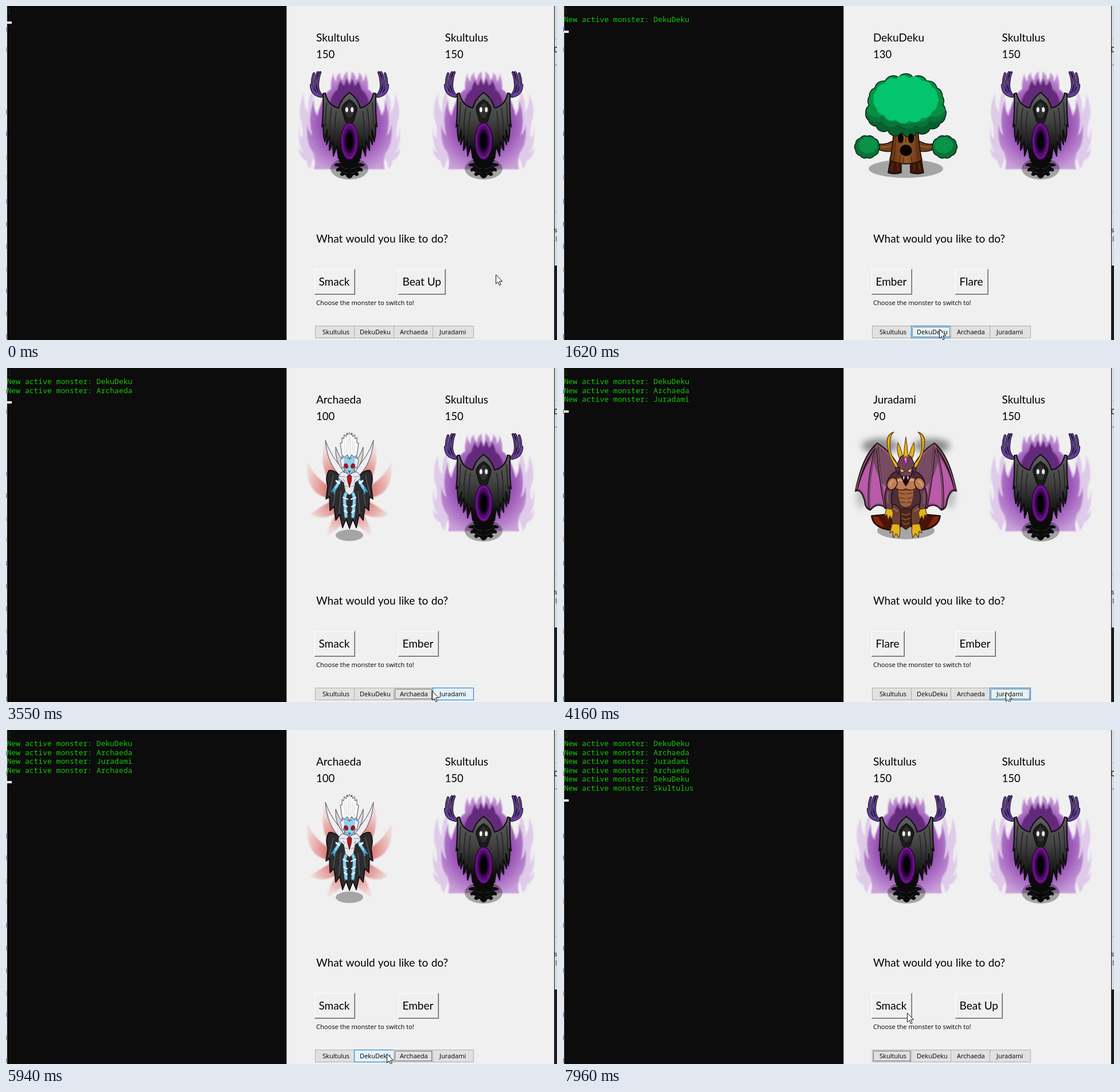
Write an HTML page that moves like this. It is 961 by 583 pixels and loops after 8 s.

```html
<!DOCTYPE html>
<html lang="en">
<head>
<meta charset="utf-8">
<title>Monster battle</title>
<style>
html, body { margin: 0; width: 100%; height: 100%; overflow: hidden; background: #f0f0f0; }
svg { display: block; width: 961px; height: 583px; }
text { white-space: pre; }
.big { font: 19px Lato, Carlito, sans-serif; }
.num { font: 18.5px Lato, Carlito, sans-serif; }
.ask { word-spacing: .6px; }
.small { font: 11.1px "Open Sans", "Noto Sans", sans-serif; }
.mono { font: 13.03px "Noto Sans Mono", "Liberation Mono", monospace; fill: #16c60c; }
rect { shape-rendering: crispEdges; }
</style>
</head>
<body>
<svg viewBox="0 0 961 583">
  <defs>
    <filter id="soft" x="-20%" y="-20%" width="140%" height="140%"><feGaussianBlur stdDeviation="1.3"/></filter>
    <filter id="smoke" x="-40%" y="-40%" width="180%" height="180%"><feGaussianBlur stdDeviation="6"/></filter>
    <radialGradient id="flame" gradientUnits="userSpaceOnUse" cx="0" cy="205" r="90">
      <stop offset=".35" stop-color="#7a359c"/><stop offset=".6" stop-color="#9c58b8"/><stop offset="1" stop-color="#c9a0d9"/>
    </radialGradient>
    <radialGradient id="petal" gradientUnits="userSpaceOnUse" cx="0" cy="212" r="78">
      <stop offset=".3" stop-color="#cf5555"/><stop offset=".65" stop-color="#e29a97"/><stop offset="1" stop-color="#efd9d7"/>
    </radialGradient>
    <linearGradient id="cloak" gradientUnits="userSpaceOnUse" x1="0" y1="150" x2="0" y2="255">
      <stop offset="0" stop-color="#606060"/><stop offset=".45" stop-color="#454545"/><stop offset="1" stop-color="#0b0b0b"/>
    </linearGradient>
    <linearGradient id="bark"><stop offset="0" stop-color="#5f300f"/><stop offset=".5" stop-color="#96582a"/><stop offset="1" stop-color="#5f300f"/></linearGradient>
  </defs>
  <g id="back"></g>
  <g id="live"></g>
</svg>
<script>
const $ = id => document.getElementById(id);
const path = (d, fill, stroke = 'none', w = 1) =>
  `<path d="${d}" fill="${fill}" stroke="${stroke}" stroke-width="${w}" stroke-linejoin="round" stroke-linecap="round"/>`;
const oval = (x, y, rx, ry, fill, extra = '') => `<ellipse cx="${x}" cy="${y}" rx="${rx}" ry="${ry}" fill="${fill}" ${extra}/>`;
const box = (x, y, w, h, fill, extra = '') => `<rect x="${x}" y="${y}" width="${w}" height="${h}" fill="${fill}" ${extra}/>`;
const frame = (x, y, w, h, color, extra = '') => box(x + .5, y + .5, w - 1, h - 1, 'none', `stroke="${color}" ${extra}`);
const text = (s, x, y, cls, extra = '') => `<text x="${x}" y="${y}" class="${cls}" ${extra}>${s}</text>`;
const both = s => `<g>${s}</g><g transform="scale(-1 1)">${s}</g>`;
const blur = (s, id = 'soft') => `<g filter="url(#${id})">${s}</g>`;

// Bumpy outline around an ellipse
function cloud(x, y, rx, ry, n, fill, stroke = 'none') {
  const pt = i => {
    const a = (i + .5) / n * 2 * Math.PI;
    return (x + rx * Math.cos(a)).toFixed(1) + ' ' + (y + ry * Math.sin(a)).toFixed(1);
  };
  const r = (rx + ry) * 2.3 / n;
  let d = 'M' + pt(0);
  for (let i = 1; i <= n; i++) d += `A${r} ${r} 0 0 1 ${pt(i)}`;
  return path(d + 'Z', fill, stroke, 1.6);
}

// Each figure is centred on x = 0
function wraith() {
  const pale = 'M28 142Q45 165 58 186Q66 166 62 144Q74 160 72 186Q81 175 79 152Q89 172 86 196Q79 214 83 232Q88 224 87 207Q92 238 80 256Q85 254 88 246Q89 264 75 270Q74 280 68 284Q66 270 60 264Q62 282 50 285L0 285L0 150';
  const main = 'M0 134Q4 124 3 114Q12 120 11 130Q18 124 16 116Q25 122 22 132Q28 128 28 117Q34 133 32 145C44 152 50 168 56 192Q64 180 61 162Q74 194 65 226Q72 220 73 206Q77 240 63 256Q58 274 62 285L0 285';
  const finger = 'M48 157Q57 147 55 134Q54 122 51 116M51 157Q61 148 60 134Q59 122 55 116M52 157Q66 150 65 134Q65 126 62 118M49 158Q66 156 67 138';
  const sleeve = 'M0 151Q8 157 13 164Q17 171 19 178Q38 174 42 152L46 153Q45 186 48 211L45 207Q47 222 43 237L39 216L40 242L34 226L35 252L29 236L28 262L22 244L19 266L10 262L0 270';
  const foot = 'M0 264L16 262Q21 272 14 274Q28 274 26 279Q21 280 17 281Q26 284 22 289Q17 287 14 290Q20 295 12 297Q7 292 5 298Q3 301 0 301';
  return blur(both(path(pale, '#dfcaea')) + both(path(main, 'url(#flame)')) +
      both(path('M0 138Q3 134 4 126Q8 132 9 139Q14 136 15 129Q20 138 21 146Q32 152 36 180L36 250L0 250', '#64297c'))) +
    oval(0, 284, 33, 19, '#000', 'opacity=".32"') +
    both(path(finger, 'none', '#160c24', 4.4) + path(finger, 'none', '#67419c', 2.2) +
      path(foot, '#0a0a0a') + path('M3 284Q12 284 17 277M3 292Q9 292 14 286', 'none', '#333', 1) +
      path(sleeve, 'url(#cloak)', '#0c0c0c', 2) +
      path('M31 178Q35 200 34 222M40 168Q42 190 42 210M23 184Q27 210 25 240', 'none', '#222', 1.5) +
      path('M0 163L7 168Q14 175 13 182L7 202L0 208', '#1b1b1b', '#080808', 1) +
      path('M0 168Q9 176 8 184L4 194L0 196', '#303030') +
      oval(4.7, 181, 3.2, 5, '#777') + oval(4.7, 181, 2, 4, '#fff')) +
    oval(0, 236, 15, 32, '#6d148a', 'stroke="#2d053a" stroke-width="1.5"') + oval(0, 236, 12, 27, '#530a70') +
    oval(0, 236, 9, 21, '#2b033c') + oval(0, 236, 6.5, 16, '#050008');
}

function tree() {
  const ink = '#0c2b18';
  const hand = cloud(67.5, 246, 21, 18.5, 10, '#087237', ink) + cloud(66, 243, 16, 13, 9, '#0a9348');
  return oval(0, 284, 65, 16, '#a5a5a5') +
    both(path('M8 268L27 268L31 291Q20 295 8 291Z', '#3a150a', '#160703', 1.5) + path('M15 273L14 288M23 274L25 288', 'none', '#6d3115', 1.5) +
      path('M20 234Q36 244 50 240L52 249Q36 256 22 253Z', '#70401a', '#241005', 1.5) +
      path('M24 244Q38 248 50 245', 'none', '#a5672d', 1.5)) +
    path('M-21 208L21 208Q22 244 28 269Q0 282 -28 269Q-22 244 -21 208Z', 'url(#bark)', '#241005', 1.8) +
    path('M-17 220L-21 268M-10 260L-11 274M17 220L21 268M9 262L11 274M0 224L0 238M-4 265L-4 276', 'none', '#57290c', 1.4) +
    both(hand) +
    cloud(0, 187, 70, 34, 17, '#07602f', ink) +
    cloud(0, 166, 65, 42, 16, '#079044', ink) +
    path('M-70 190Q-56 209 -42 201Q-30 218 -13 208Q3 221 17 209Q32 217 42 201Q58 207 70 188Q60 170 0 170Q-60 170 -70 190Z', '#08733a') +
    path('M-69 183Q-56 200 -42 192Q-28 207 -13 200Q3 212 17 200Q32 207 42 192Q58 197 69 182Q55 150 0 150Q-55 150 -69 183Z', '#079044') +
    cloud(0, 163, 56, 37, 15, '#02c56d') +
    both(oval(9, 231, 5, 8.5, '#080402')) + oval(0, 252, 10.5, 10, '#080402');
}

function seraph() {
  const line = '#4b4b55', skin = '#8fd0ea';
  const leg = 'M4 216Q10 222 8 238L6 259', arm = 'M14 191L21 204L27 213';
  return blur(both(path('M10 195Q24 165 43 131Q54 165 34 202Z', 'url(#petal)') +
      path('M18 215Q56 200 73 164Q77 200 58 218Q40 230 18 230Z', 'url(#petal)') +
      path('M18 225Q42 236 68 255Q48 268 20 252Z', 'url(#petal)') +
      path('M8 238Q32 258 39 291Q16 282 3 258Z', 'url(#petal)'))) +
    oval(0, 292, 24, 10, '#a5a5a5') +
    both(path('M0 188L14 190Q28 176 36 179Q43 192 38 206L41 229L35 225L34 249L27 242L24 266L17 256L12 279L6 264L0 280', '#2c2c2e', '#080808', 1.5) +
      path('M28 188L36 222M22 198L28 240M15 215L18 254M7 226L8 264', 'none', '#5b5b5e', 1.3) +
      path('M14 190Q39 168 42 126Q33 154 9 179Z', '#eeeef2', line) +
      path('M9 182Q26 164 24 138Q18 155 8 168Z', '#d9d9df', line) +
      path(leg, 'none', '#25536b', 7.5) + path(leg, 'none', skin, 5) + path('M3 229L11 226M4 242L10 239M4 252L9 249', 'none', '#f4f4f8', 2.2) +
      path(arm, 'none', '#25536b', 7) + path(arm, 'none', skin, 4.5) + path('M18 201L23 197', 'none', '#fff', 3) +
      path('M26 210L31 216M25 213L27 219', 'none', '#3d9cc6', 2.2) +
      path('M0 185L12 181Q20 185 19 193L10 200L7 216L0 222', '#e7e7ee', line) +
      path('M8 190L17 189M8 198L11 194M3 207L8 206', 'none', '#8d8d9a', 1.2) +
      path('M0 148L13 154L14 166L8 178L0 188', skin, '#315f78') +
      path('M10 156L16 160L13 175L9 171M0 159L4 157', '#eeeef4', line, .8) +
      oval(6, 171, 3.8, 4.8, '#9d171c', 'transform="rotate(25 6 171)"') +
      path('M0 113L3 117L4 113L6 120L9 116L10 124L13 121L13 131L16 131L13 152L8 156L4 151L0 158', '#fafafa', line) +
      path('M1 120L2 150M5 124L5 148M9 128L8 149', 'none', '#d0d0d6', .8)) +
    path('M-4 189L0 186L4 189L3 198L0 209L-3 198Z', '#b6161c', '#4f0508', .8) +
    path('M-3 179L0 185L3 179Z', '#337c9f');
}

function demon() {
  const ink = '#241019', gold = '#e3b11e', hide = '#65414f', flesh = '#bd7d54';
  const forearm = 'M29 213Q33 226 29 242';
  return blur(both(oval(45, 136, 32, 13, '#8c8c8c') + oval(78, 222, 7, 24, '#b5b5b5')), 'smoke') +
    oval(0, 284, 50, 15, '#a5a5a5') +
    both(path('M10 178Q24 146 50 131Q76 153 88 215Q78 210 72 232Q71 246 62 248Q48 232 34 246L14 220Z', '#774b62', ink, 2) +
      path('M58 156Q74 176 85 211Q76 208 69 232Q69 243 62 245Q49 230 35 241L30 212Q50 196 58 156Z', '#b95aab') +
      path('M50 133Q68 190 64 246M50 133Q47 190 36 244M50 133Q74 165 86 213', 'none', ink, 3.8) +
      path('M50 133Q67 190 64 244M50 133Q46 190 36 242M15 176Q28 148 50 134Q75 160 86 211', 'none', '#8d5c79', 1.8) +
      path('M0 252L60 258Q58 279 28 283L0 274', '#4a1308', '#190402', 1.8) +
      path('M48 260L58 259Q55 273 38 278Z', '#83250d') +
      path('M0 165L16 180Q30 186 33 200L29 235Q32 252 20 258L0 262', '#4c2e38', ink, 1.5) +
      path('M8 250Q18 232 32 241Q38 254 26 264L21 277L10 276Z', '#6d4034', ink, 1.6) +
      path('M15 250Q24 242 30 248', 'none', '#a0694a', 2.2) +
      path('M11 273L24 272L28 288L23 285L22 296L17 289L12 296L10 286Z', gold, '#523708', 1.2) +
      path('M0 212Q8 215 14 210Q15 226 9 240L0 244', '#a2633f', '#4b2114', 1.2) +
      path('M2 220L12 218M2 228L11 226M2 235L9 234', 'none', '#66351f', 1.6) +
      path('M0 193Q10 188 18 194Q22 204 16 211Q8 215 0 211', flesh, '#4b2114', 1.4) +
      path('M4 197Q11 193 16 198', 'none', '#e3af83', 2.4) +
      path(forearm, 'none', ink, 13) + path(forearm, 'none', hide, 9.5) + path('M31 218Q33 227 31 236', 'none', '#8f6072', 2) +
      oval(24, 202, 8.5, 11, flesh, `stroke="${ink}" stroke-width="1.5" transform="rotate(-25 24 202)"`) +
      path('M22 197Q27 199 28 206', 'none', '#dba57b', 2) +
      path('M24 247L34 245L37 259L33 256L31 266L28 258L24 264L22 253Z', gold, '#523708', 1.2) +
      path('M12 170Q32 152 27 125Q26 115 21 112Q36 116 32 138Q29 158 15 178Z', gold, '#5e400a', 1.4) +
      path('M11 158Q17 146 14 130Q7 143 5 156Z', gold, '#5e400a', 1.1) +
      path('M0 150L9 155L15 168L11 182L6 195L0 201', '#6d4355', ink, 1.4) +
      path('M2 180L11 175L8 182Z', '#ffe14d', ink, .8) +
      path('M0 189L7 188L5 199L0 207', '#1e080c') + path('M5 189L4 196L2 190Z', '#fff') +
      path('M11 173L19 174L14 186Z', '#533144', ink, 1)) +
    path('M-4 156Q-3 138 0 120Q3 138 4 156Z', gold, '#5e400a', 1.1) +
    oval(0, 161, 3, 6.5, '#d843c0', 'stroke="#571350"') + oval(-.8, 159, 1, 2.8, '#ffc5f5') +
    path('M-10 248Q0 242 10 248L8 276L0 282L-8 276Z', '#4d2419', ink, 1.2) +
    path('M-7 254Q0 259 7 254M-7 262Q0 267 7 262M-6 270Q0 275 6 270', 'none', '#935535', 1.6);
}

const monsters = [
  { name: 'Skultulus', hp: 150, moves: ['Smack', 'Beat Up'], art: wraith(), x: 599, left: 539, right: 607, label: 552 },
  { name: 'DekuDeku', hp: 130, moves: ['Ember', 'Flare'], art: tree(), x: 598, left: 607, right: 676, label: 617 },
  { name: 'Archaeda', hp: 100, moves: ['Smack', 'Ember'], art: seraph(), x: 599, left: 676, right: 744, label: 687 },
  { name: 'Juradami', hp: 90, moves: ['Flare', 'Ember'], art: demon(), x: 598, left: 744, right: 816, label: 756 }
];
const moveWidth = { Smack: 71, Ember: 71, Flare: 58, 'Beat Up': 83 };
const picks = [[1600, 1], [2910, 2], [4160, 3], [5470, 2], [6320, 1], [7330, 0]];
const mouse = [
  [602, 854, 469], [1460, 656, 564], [1692, 656, 564], [2460, 749, 552], [2540, 749, 552], [2770, 722, 564],
  [3310, 722, 564], [3545, 743, 564], [3855, 772, 566], [4250, 772, 566], [4780, 724, 566], [5630, 724, 566],
  [5940, 664, 565], [6100, 655, 565], [6570, 655, 565], [6800, 599, 565], [6885, 599, 565], [7100, 592, 567],
  [7500, 592, 567], [7950, 600, 494]
];
const loop = 8000, step = 77.4;

const stand = (m, x) => `<g transform="translate(${x} 0)">${m.art}</g>`;

function moveButton(s, x) {
  const w = moveWidth[s], y = 459, h = 45;
  return box(x, y, w, h, '#696969') + box(x, y, w - 1, h - 1, '#fff') + box(x + 1, y + 1, w - 2, h - 2, '#a0a0a0') +
    box(x + 1, y + 1, w - 3, h - 3, '#f0f0f0') + text(s, x + 7.5, 488, 'big');
}

// Each tab's right edge lies under its neighbour
function tab(m, hover, pressed, focus) {
  const w = m.right - m.left + (m.right < 816 ? 1 : 0);
  const [fill, edge] = pressed ? ['#cce4f7', '#005499'] : hover ? ['#e5f1fb', '#0078d7'] : ['#e1e1e1', '#adadad'];
  return box(m.left, 558, w, 22, fill) + frame(m.left, 558, w, 22, edge) +
    (focus ? frame(m.left + 2, 560, w - 4, 18, '#000', 'stroke-dasharray="1 1"') : '') +
    text(m.name, m.label, 573, 'small');
}

function mouseAt(t) {
  const i = mouse.findIndex(k => k[0] > t);
  if (i < 0) return mouse.at(-1).slice(1);
  if (i === 0) return mouse[0].slice(1);
  const [a, b] = [mouse[i - 1], mouse[i]], f = (t - a[0]) / (b[0] - a[0]);
  return [1, 2].map(j => Math.round(a[j] + (b[j] - a[j]) * f));
}

function backdrop() {
  const specks = [[41, '#2860b0'], [76, '#777'], [185, '#2860b0'], [223, '#4a3d9c'], [264, '#888'], [299, '#d08a3c'],
    [341, '#2860b0'], [381, '#555'], [420, '#555'], [460, '#c07830'], [497, '#2860b0'], [537, '#555'], [577, '#555']];
  return box(0, 0, 961, 583, '#f0f0f0') + box(0, 0, 2, 583, '#dfe1e6') +
    specks.map(([y, c]) => box(0, y - 4, 1, 8, c)).join('') +
    box(2, 0, 487, 583, '#0c0c0c') + box(489, 0, 1, 583, '#a0a0a0') + text('1', 1.5, 13, 'mono', 'opacity=".25"') +
    box(956, 0, 1, 583, '#111') + box(957, 0, 4, 453, '#d6dae2') + box(957, 453, 4, 130, '#1b1b1b') +
    box(957, 57, 4, 1, '#bbb') + box(957, 71, 4, 10, '#555') + box(958, 73, 3, 6, '#ddd') + box(957, 102, 4, 2, '#78aede') +
    box(957, 360, 4, 1, '#bbb') + text('s', 956, 395, 'small') + box(959, 402, 1, 9, '#3c3c88') +
    text('Skultulus', 765.5, 62, 'big') + text('150', 765.5, 91, 'num') + stand(monsters[0], 833) +
    text('What would you like to do?', 541, 413, 'big ask') +
    text('Choose the monster to switch to!', 541, 522, 'small');
}

function scene(t) {
  const done = picks.filter(p => t >= p[0]);
  const next = picks[done.length];
  const press = next && t >= next[0] - 78 ? next[1] : -1;
  const active = done.length ? done.at(-1)[1] : 0;
  const focus = press >= 0 ? press : done.length ? active : -1;
  const m = monsters[active], [x, y] = mouseAt(t);
  const over = b => y >= 558 && y < 580 && x + 2 >= b.left && x + 2 < b.right;
  const rows = done.map((p, i) => text('New active monster: ' + monsters[p[1]].name, 1.7, 28 + 15.6 * i, 'mono'));
  return rows.join('') + box(2, Math.round(27 + 15.6 * done.length), 8, 4, '#f2f2f2') +
    text(m.name, 541, 62, 'big') + text(m.hp, 541, 91, 'num') + stand(m, m.x) +
    moveButton(m.moves[0], 538) + moveButton(m.moves[1], 684) +
    monsters.map((b, i) => tab(b, over(b), i === press, i === focus)).join('') +
    `<g transform="translate(${x + .5} ${y + .5})">` +
    path('M0 0V15.5L3.6 12.2L6.2 18L8.6 17L6 11.2H10.8Z', '#fff', '#111', 1) + '</g>';
}

$('back').innerHTML = backdrop();
let shown = null;
function tick(now) {
  const t = now % loop;
  const held = 680 + step * Math.floor((t - 680) / step + .12);
  if (held !== shown) $('live').innerHTML = scene(shown = held);
  requestAnimationFrame(tick);
}
requestAnimationFrame(tick);
</script>
</body>
</html>
```
